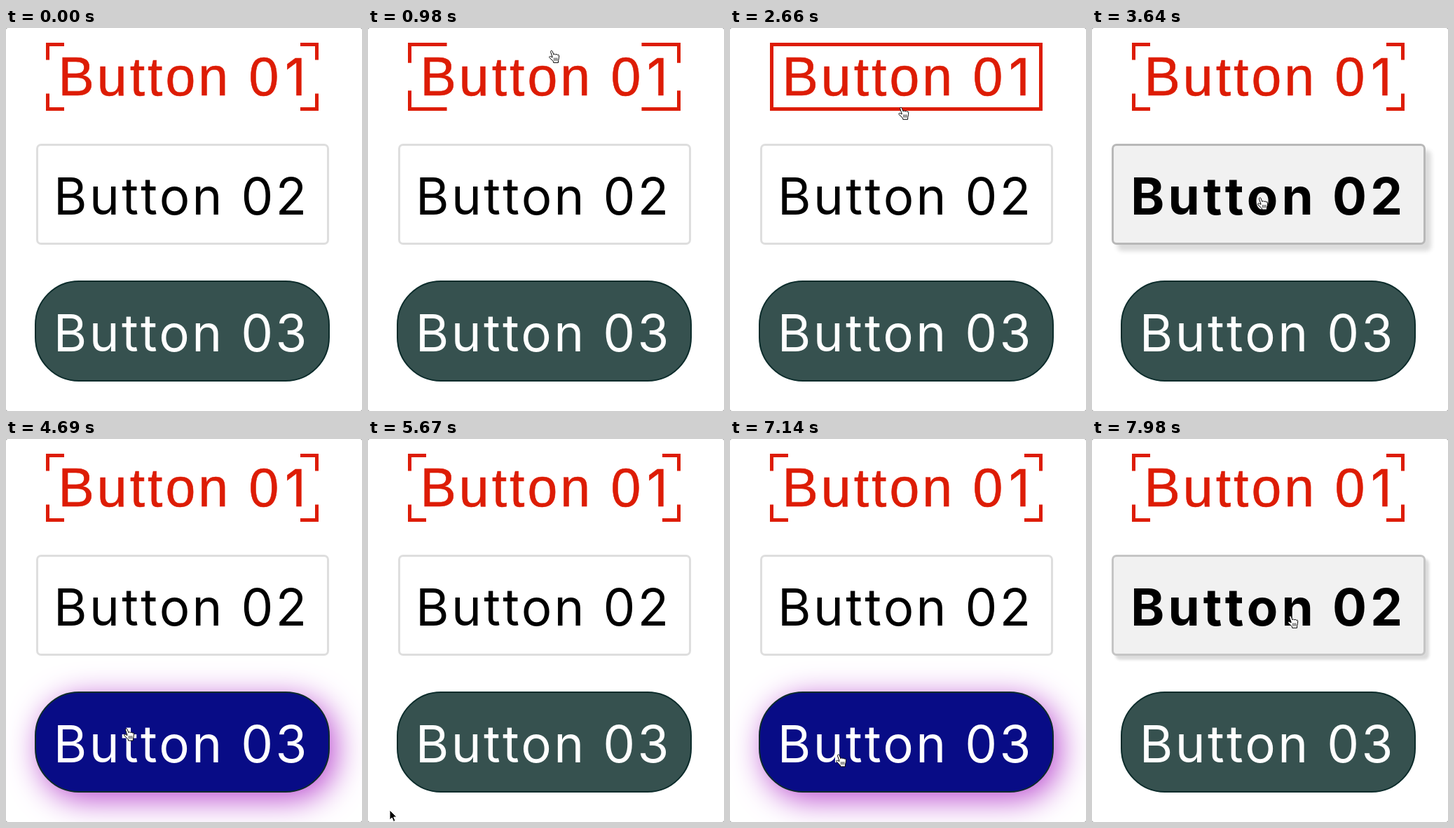
An HTML page that plays this animation: 508x546 px, repeating every 8000 ms.

```html
<!DOCTYPE html>
<html lang="en">
<head>
<meta charset="utf-8">
<title>Hover buttons</title>
<style>
  html, body { margin: 0; width: 100%; height: 100%; overflow: hidden; background: #999; }
  #stage { position: relative; width: 508px; height: 546px; overflow: hidden; background: #fff; border-radius: 3px; }
  .box { --p: 0; position: absolute; box-sizing: border-box; height: 144px; }
  #box2 {
    left: 43px; top: 165px; width: 418px; border-radius: 7px; background: #fff;
    border: 3px solid color-mix(in srgb, #b8b8b8 calc(var(--p) * 100%), #dedede);
    box-shadow: calc(var(--p) * 8px) calc(var(--p) * 9px) calc(var(--p) * 6px) rgba(0, 0, 0, .14);
  }
  #box2.on { left: 28px; width: 448px; background: #f1f1f1; }
  #box3 {
    left: 41px; top: 360px; width: 421px; border-radius: 63px; border: 2px solid #0c2c2b;
    background: color-mix(in srgb, #080c86 calc(var(--p) * 100%), #36514f);
    box-shadow: 8px 10px 45px rgba(186, 75, 208, var(--p));
  }
  svg { position: absolute; inset: 0; }
  text { font: 400 72.7px Inter, sans-serif; letter-spacing: 3.3px; text-anchor: middle; }
  #label1 {
    font: 77px "Liberation Sans", Arial, sans-serif; letter-spacing: 4px;
    text-anchor: start; fill: #dd1c05; stroke: #dd1c05; stroke-width: .6;
  }
  #label1 .one { font: 73px Inter, sans-serif; }
  #label2.on { font-weight: 700; letter-spacing: 5.1px; transform: translateX(1.5px); }
</style>
</head>
<body>
<div id="stage">
  <div class="box" id="box2"></div>
  <div class="box" id="box3"></div>
  <svg width="508" height="546">
    <path id="corners" fill="none" stroke="#dd1c05" stroke-width="5"/>
    <text id="label1" x="74.5" y="95.5">Button 0<tspan class="one" x="398">1</tspan></text>
    <text id="label2" x="250.2" y="266">Button 02</text>
    <text x="250.2" y="460.5" fill="#fff">Button 03</text>
    <path id="arrow" d="M0 0V14L3.2 11L5.5 16.4L8 15.3L5.7 10H10Z" stroke="#fff"/>
    <g id="hand" stroke="#000" stroke-linecap="round" stroke-linejoin="round">
      <path fill="#fff" d="M1 10L-1.4 3C-2 .8 .4 .1 1.1 2L2.9 6.6Q4.5 4.6 5.6 6.6Q7.2 5 8.2 7Q10.3 6 10.5 8.2T9.5 15L9.4 18H2.6L2.2 16L-3 11C-4.2 9.5 -2.6 8.4 -1.2 9.4Z"/>
      <path fill="none" stroke-width=".8" d="M3.6 11.5V15m2 0V11.5m2 0V15"/>
    </g>
  </svg>
</div>
<script>
const LOOP = 8000;
const byId = id => document.getElementById(id);
const clamp = v => Math.min(1, Math.max(0, v));
const smooth = v => v * v * (3 - 2 * v);
const lerp = (a, b, k) => a + (b - a) * k;

// Eased pointer moves: the pointer rests between them
const entry = { x: 292, y: -18 };
const moves = [
  { from: 500, to: 1300, x: 246, y: 58 },
  { from: 2300, to: 3300, x: 240, y: 241 },
  { from: 3640, to: 4200, x: 172, y: 412 },
  { from: 4690, to: 5500, x: 31, y: 529 },
  { from: 5750, to: 6500, x: 155, y: 449 },
  { from: 7600, to: 8000, x: 284, y: 250 }
];

const buttons = {
  1: { left: 57, right: 446, top: 21, bottom: 118 },
  2: { left: 43, right: 461, top: 165, bottom: 309 },
  3: { left: 41, right: 462, top: 360, bottom: 504 }
};

function pointerAt(t) {
  return moves.reduce((p, { from, to, x, y }) => {
    const k = smooth(clamp((t - from) / (to - from)));
    return { x: lerp(p.x, x, k), y: lerp(p.y, y, k) };
  }, entry);
}

function isOver(n, t) {
  const { x, y } = pointerAt(t), b = buttons[n];
  return x > b.left && x < b.right && y > b.top && y < b.bottom;
}

// Share of the last `ms` spent over the button, eased
function hoverAmount(n, t, ms) {
  const steps = 30;
  let over = 0;
  for (let i = 0; i < steps; i++) over += isOver(n, t - ms * i / steps);
  return smooth(over / steps);
}

function drawCorners(k) {
  const h = lerp(23.5, 192, k), v = lerp(22, 46, k);
  let d = "";
  for (const sx of [1, -1]) for (const sy of [1, -1]) {
    const x = 251.5 - sx * 192, y = 69.5 - sy * 46;
    d += `M${x} ${y + sy * v}V${y}H${x + sx * h}`;
  }
  byId("corners").setAttribute("d", d);
}

function render(t) {
  drawCorners(hoverAmount(1, t, 300));
  byId("box2").style.setProperty("--p", hoverAmount(2, t, 210));
  byId("box3").style.setProperty("--p", hoverAmount(3, t, 200));
  for (const id of ["box2", "label2"]) byId(id).classList.toggle("on", isOver(2, t));

  const { x, y } = pointerAt(t);
  const pointing = [1, 2, 3].some(n => isOver(n, t));
  for (const [id, shown] of [["hand", pointing], ["arrow", !pointing]]) {
    byId(id).setAttribute("transform", `translate(${x} ${y})`);
    byId(id).style.display = shown ? "" : "none";
  }
}

const start = performance.now();
function frame() {
  render((performance.now() - start) % LOOP);
  requestAnimationFrame(frame);
}
frame();
</script>
</body>
</html>
```
